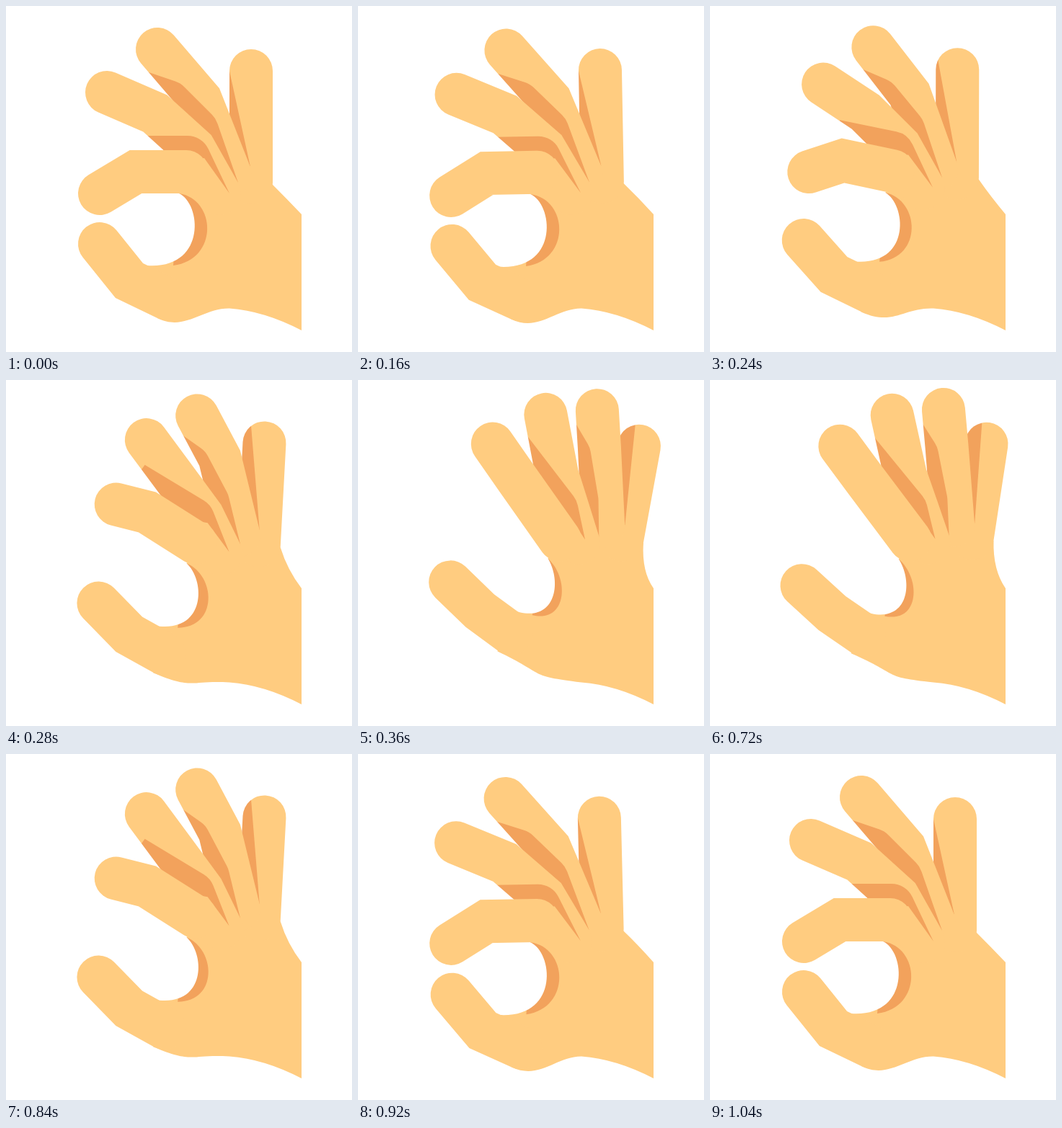
Animation of 480x480 px, one loop 1120 ms. Source, as an HTML page with a canvas:

```html
<!DOCTYPE html>
<html lang="en">
<head>
<meta charset="utf-8">
<title>Hand gesture</title>
<style>
  html, body { margin: 0; width: 100%; height: 100%; overflow: hidden; background: #fff; }
  canvas { display: block; width: 100%; height: 100%; }
</style>
</head>
<body>
<canvas width="480" height="480"></canvas>
<script>
const LIGHT = '#ffcc80', DARK = '#f2a25c';
const LOOP = 1120, STEP = 40, LAST = 9;
const PIVOT = [288, 305];

// Key points: x, y when closed, then x, y when open.
const hand = {
  // Centre lines, from the fingertip down.
  thumb: [[130, 330, 127, 290], [171, 381, 170, 327], [223, 406, 215, 356]],
  index: [[130, 260, 174, 95], [180, 230, 211, 142], [250, 230, 275, 222]],
  middle: [[140, 120, 245, 50], [207, 149, 266, 133], [261, 198, 284, 180], [296, 260, 301, 225]],
  ring: [[210, 60, 316, 40], [270, 130, 322, 90], [311, 234, 334, 200]],
  pinky: [[340, 90, 377, 86], [340, 245, 361, 217]],
  // Shade outlines: start, rounded corners, end.
  middleShade: [[198, 180, 222, 82], [272, 180, 295, 166], [310, 260, 310, 220]],
  ringShade: [[198, 92, 290, 64], [242, 107, 309, 92], [291, 156, 325, 162], [322, 245, 329, 215]],
  pinkyShade: [[310, 90, 370, 56], [339, 223, 364, 197]],
  knuckle: [[275, 211, 285, 187]],
  // Palm: wrist to little finger, inner curve and its shade, heel of the thumb.
  side: [[390, 268, 391, 260], [370, 248, 391, 220]],
  inner: [[240, 260, 260, 249], [272, 275, 283, 282], [278, 366, 276, 345], [195, 360, 210, 322]],
  innerShade: [[292, 268, 292, 275], [295, 352, 292, 337], [232, 360, 243, 329]],
  heel: [[210, 433, 198, 382], [248, 452, 270, 411], [272, 419, 240, 413]]
};

const ctx = document.querySelector('canvas').getContext('2d');

const clamp = (v, lo, hi) => Math.min(hi, Math.max(lo, v));
const smooth = v => (v = clamp(v, 0, 1), v * v * (3 - 2 * v));
const bump = (v, centre, half) =>
  Math.cos(clamp((v - centre) / half, -1, 1) * Math.PI / 2) ** 2;

// The fingers unbend while the hand winds up, swings too far and settles.
function pose(step) {
  const bend = smooth((step - 2.8) / 4.2);
  const swing = 0.06 * bump(step, 7, 2) - 0.025 * bump(step, 3, 3);
  const cos = Math.cos(swing), sin = Math.sin(swing);
  const place = ([x0, y0, x1, y1]) => {
    const x = x0 + (x1 - x0) * bend - PIVOT[0];
    const y = y0 + (y1 - y0) * bend - PIVOT[1];
    return [PIVOT[0] + x * cos - y * sin, PIVOT[1] + x * sin + y * cos];
  };
  return Object.fromEntries(
    Object.entries(hand).map(([name, points]) => [name, points.map(place)]));
}

function finger(points) {
  ctx.beginPath();
  points.forEach(p => ctx.lineTo(...p));
  ctx.stroke();
}

// Paints only on top of what is already drawn.
function fillShade() {
  ctx.globalCompositeOperation = 'source-atop';
  ctx.fillStyle = DARK;
  ctx.fill();
  ctx.globalCompositeOperation = 'source-over';
}

// The outline starts outside the finger and closes beneath the one in front.
function shade(edge, front, ...below) {
  const [[x, y], [nextX, nextY]] = edge;
  const reach = 20 / Math.hypot(nextX - x, nextY - y);
  ctx.beginPath();
  ctx.moveTo(x - (nextX - x) * reach, y - (nextY - y) * reach);
  for (let i = 1; i < edge.length - 1; i++) ctx.arcTo(...edge[i], ...edge[i + 1], 32);
  [edge.at(-1), ...below, front[1], front[0]].forEach(p => ctx.lineTo(...p));
  fillShade();
}

function palm({ side, inner, heel }) {
  ctx.beginPath();
  ctx.moveTo(410, 450);
  ctx.lineTo(410, 289);
  ctx.quadraticCurveTo(...side.flat());
  ctx.lineTo(320, 195);
  ctx.lineTo(...inner[0]);
  ctx.bezierCurveTo(...inner.slice(1).flat());
  ctx.lineTo(...heel[0]);
  ctx.bezierCurveTo(...heel.slice(1).flat(), 310, 419.5);
  ctx.quadraticCurveTo(358, 423, 410, 450);
  ctx.fillStyle = LIGHT;
  ctx.fill();
}

function draw(step) {
  const p = pose(step);
  ctx.clearRect(0, 0, 480, 480);
  ctx.strokeStyle = LIGHT;
  ctx.lineWidth = 60;
  ctx.lineCap = 'round';
  palm(p);
  finger(p.pinky);
  shade(p.pinkyShade, p.ring);
  finger(p.ring);
  shade(p.ringShade, p.middle);
  finger(p.middle);
  shade(p.middleShade, p.index, ...p.knuckle);
  finger(p.index);
  finger(p.thumb);
  ctx.beginPath();
  ctx.moveTo(...p.inner[0]);
  ctx.bezierCurveTo(...p.innerShade.flat());
  fillShade();
}

const stepsSince = (t, start) => clamp(Math.floor((t - start) / STEP) + 1, 0, LAST);

const begin = performance.now();
function tick() {
  const t = (performance.now() - begin) % LOOP;
  draw(stepsSince(t, 120) - stepsSince(t, 720));
  requestAnimationFrame(tick);
}
tick();
</script>
</body>
</html>
```
